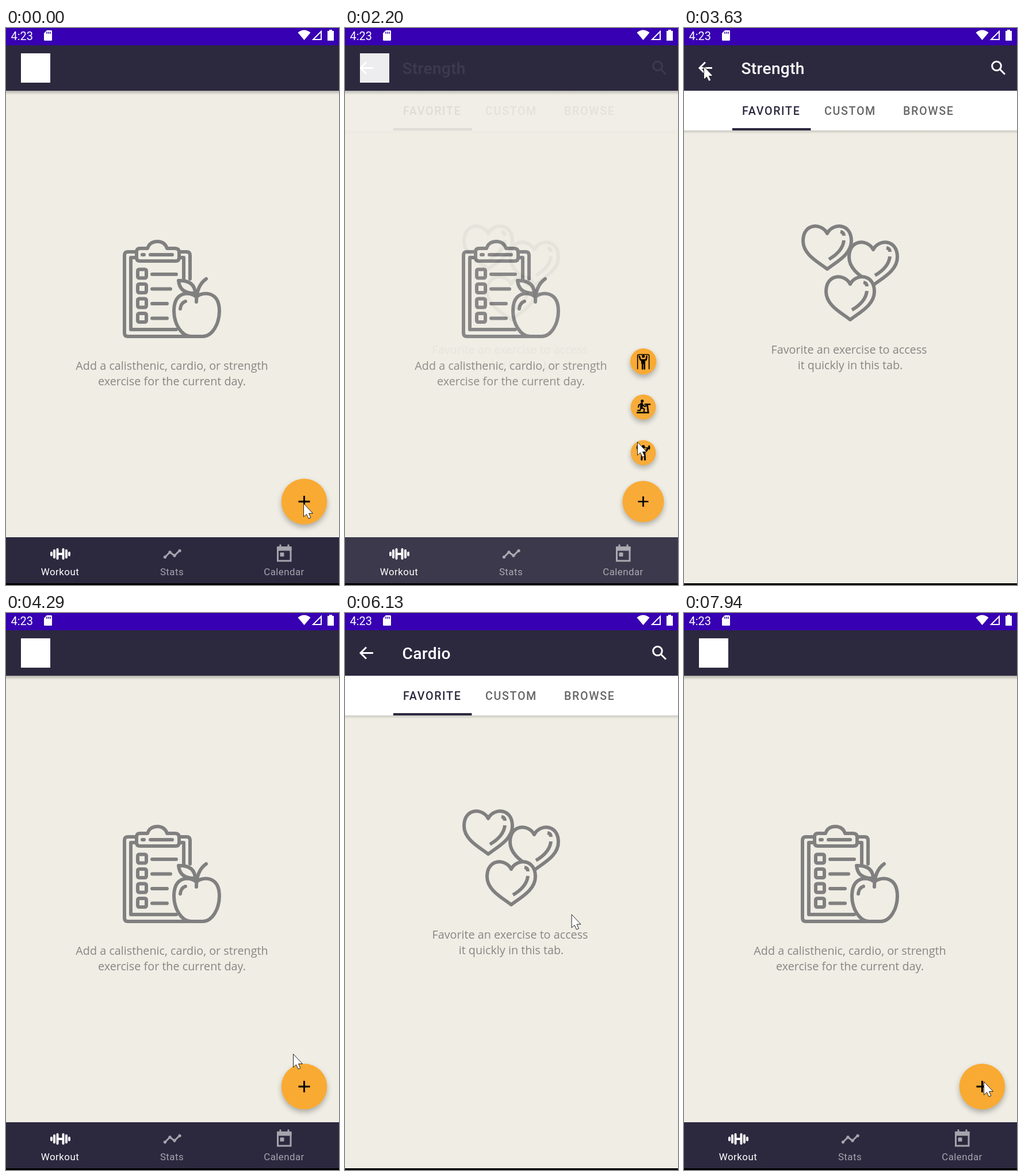
Animation of 579 by 968 pixels, one loop 8000 ms. Source, as an HTML page:

```html
<!DOCTYPE html>
<html lang="en">
<head>
<meta charset="utf-8">
<title>Workout app</title>
<style>
  html, body { margin: 0; width: 100%; height: 100%; overflow: hidden; background: #000; }
  svg { display: block; width: 100vw; height: 100vh; }
  text { font-family: Roboto, sans-serif; }
  .hint { font: 19.8px "Open Sans", sans-serif; fill: #878683; text-anchor: middle; }
  .tab { font-size: 19.7px; font-weight: 500; letter-spacing: 1.65px; fill: #666; }
  .nav { font-size: 16.9px; letter-spacing: .45px; text-anchor: middle; }
  .line { fill: none; stroke: #808080; stroke-width: 6; stroke-linecap: round; stroke-linejoin: round; }
  .shadow { filter: drop-shadow(0 5px 5px rgba(0,0,0,.27)); }
</style>
</head>
<body>
<svg viewBox="0 0 579 968" preserveAspectRatio="none">
  <defs>
    <linearGradient id="shade" x2="0" y2="1">
      <stop stop-color="#000" stop-opacity=".25"/><stop offset="1" stop-color="#000" stop-opacity="0"/>
    </linearGradient>
    <g id="heart">
      <path class="line" style="fill:#efede4" d="M0 0C-10-19-42-18-42 13C-42 37-15 50 0 62C15 50 42 37 42 13C42-18 10-19 0 0Z"/>
      <path class="line" style="stroke-linecap:butt" d="M3 45Q27 31 29 12M23-3Q29-2 29 4"/>
    </g>
  </defs>
  <rect width="579" height="965" fill="#efede4"/>

  <g id="home">
    <rect y="30" width="579" height="79" fill="#2c293f"/>
    <rect y="109" width="579" height="7" fill="url(#shade)"/>
    <rect x="26" y="44" width="51" height="51" fill="#fff"/>
    <g class="line">
      <path d="M320 436V395Q320 389 314 389H302M226 389H212Q206 389 206 395V530Q206 536 212 536H318"/>
      <path d="M225 399H217V524H296M303 399H309V437"/>
      <path d="M233 383H246Q250 371 263 371T280 383H294Q301 383 301 390V399Q301 405 295 405H233Q227 405 227 399V389Q227 383 233 383ZM251 394H289M237 394H240"/>
      <g id="checks"></g>
      <path fill="#efede4" d="M331 467C318 457 292 458 292 492C292 515 306 536 322 536C328 536 335 536 342 536C358 536 371 515 371 492C371 458 344 457 331 467Z"/>
      <path fill="#efede4" d="M300 439Q328 438 329 461Q302 462 300 439Z"/>
      <path d="M331 476C331 455 338 443 348 436M303 488Q304 478 312 475"/>
    </g>
    <text class="hint" x="288.5" y="594">Add a calisthenic, cardio, or strength</text>
    <text class="hint" x="288.5" y="621">exercise for the current day.</text>
  </g>

  <g id="nav">
    <rect y="885" width="579" height="80" fill="#2c293f"/>
    <path d="M79 912V916M84 908V920M89.500 906V922M99.500 906V922M105 908V920M110 912V916M90 914H99" stroke="#fff" stroke-width="4" stroke-linecap="round"/>
    <g fill="#a5a4ad" stroke="#a5a4ad">
      <path d="M277 919L285 911L293 917L302 908" fill="none" stroke-width="3"/>
      <circle cx="276.500" cy="919.500" r="2.300"/><circle cx="285" cy="911" r="2.300"/>
      <circle cx="293" cy="917" r="2.300"/><circle cx="302" cy="908.500" r="2.300"/>
      <path d="M472.500 902.500H495V926H472.500Z" fill="none" stroke-width="3"/>
      <path d="M472 902H496V908H472ZM476 898H478V902H476ZM490 898H492V902H490ZM477 912H483V918H477Z"/>
    </g>
    <text class="nav" x="94" y="951" fill="#fff">Workout</text>
    <text class="nav" x="288.500" y="951" fill="#a5a4ad">Stats</text>
    <text class="nav" x="483.500" y="951" fill="#a5a4ad">Calendar</text>
  </g>

  <g id="detail">
    <rect y="109" width="579" height="856" fill="#efede4"/>
    <rect y="30" width="579" height="79" fill="#2c293f"/>
    <circle id="ripple" cx="34.500" cy="68.500" fill="#fff" fill-opacity=".18"/>
    <path d="M37 59.500L27 69.500L37 79.500M27 69.500H49" fill="none" stroke="#fff" stroke-width="3"/>
    <text id="title" x="99.500" y="80" font-size="28.200" font-weight="500" letter-spacing=".3" fill="#fff"></text>
    <g fill="none" stroke="#fff" stroke-width="3"><circle cx="543.500" cy="66" r="7.800"/><path d="M549 71.500L558 80.500"/></g>
    <rect y="109" width="579" height="69" fill="#fff"/>
    <rect y="178" width="579" height="6" fill="url(#shade)" opacity=".6"/>
    <rect x="84" y="174" width="136.500" height="4" fill="#2c293f"/>
    <text class="tab" x="101" y="151" style="fill:#2c293f">FAVORITE</text>
    <text class="tab" x="244" y="151">CUSTOM</text>
    <text class="tab" x="381" y="151">BROWSE</text>
    <use href="#heart" x="329" y="385"/><use href="#heart" x="249" y="357"/><use href="#heart" x="289" y="445"/>
    <text class="hint" x="287" y="566">Favorite an exercise to access</text>
    <text class="hint" x="289" y="593">it quickly in this tab.</text>
  </g>

  <rect width="579" height="30" fill="#3700b3"/>
  <text x="8.500" y="20.500" font-size="20" fill="#fff">4:23</text>
  <path d="M71 4H78.500Q80 4 80 5.500V20.500Q80 22 78.500 22H67.500Q66 22 66 20.500V9Z" fill="#fff"/>
  <path d="M71 6.500V10M74 6.500V10M77 6.500V10" stroke="#3700b3" stroke-width="1.500"/>
  <path d="M518.500 21L507.500 8Q518.500-1 529.500 8ZM559 5H562V3H567V5H570V22H559Z" fill="#fff"/>
  <path d="M548 6V20H534Z" fill="none" stroke="#fff" stroke-width="2"/>

  <g id="minis" stroke="#000" fill="none" stroke-linecap="round">
    <g class="shadow"><circle r="22.800" fill="#f9aa33" stroke="none"/>
      <circle cy="-9" r="2.600" fill="#000" stroke="none"/>
      <path d="M-6-2L-4-4V-8M5-2L3-4" stroke="none"/>
      <path d="M-7-9L-5-3L0-2.500L5-3L6-9M-1.500 3V13M2 3V13" stroke-width="2.600"/>
      <path d="M-3.500-3H3.500L2.500 4H-2.500Z" fill="#000"/>
      <path d="M-10 13V-10Q-10-12-8-12H8Q10-12 10-10V13" stroke-width="1.600"/></g>
    <g class="shadow"><circle r="22.800" fill="#f9aa33" stroke="none"/>
      <circle cx="-2" cy="-11" r="2.700" fill="#000" stroke="none"/>
      <path d="M-3-6L-3.500 1" stroke-width="5"/>
      <path d="M-3-6L-8-4L-9 0M-2-5L2-1L5-2M-3 1L2 4L1 8M-4 1L-6 6L-10 6" stroke-width="2.300"/>
      <path d="M-11 10H9L7-5M3-5H12" stroke-width="2.800"/></g>
    <g class="shadow"><circle r="22.800" fill="#f9aa33" stroke="none"/>
      <circle cy="-11" r="2.900" fill="#000" stroke="none"/>
      <path d="M-12-9H12" stroke-width="1.500"/>
      <path d="M-10.500-12V-7M10.500-12V-7" stroke-width="3"/>
      <path d="M-8-8L-6-4H6L8-8M-2.500 4L-3 12.500M2.500 4L3 12.500" stroke-width="3.200"/>
      <path d="M-4-4H4L3 5H-3Z" fill="#000"/></g>
  </g>
  <g id="fab" class="shadow">
    <circle r="39.800" fill="#f9aa33"/>
    <path id="plus" d="M-10 0H10M0-10V10" stroke="#000" stroke-width="3"/>
  </g>
  <path id="cursor" d="M.5.5V23.500L5.500 19L9 26.500L13 25L9.500 17.500H16.500Z" stroke="#222" stroke-width="1"/>
  <circle id="tap" r="17.500" fill="#ffe900" fill-opacity=".6"/>
</svg>
<script>
const $ = id => document.getElementById(id);
const clamp = v => Math.min(1, Math.max(0, v));
const part = (t, start, span) => clamp((t - start) / span);
const smooth = p => p * p * (3 - 2 * p);
const out = p => 1 - (1 - p) ** 2;
const place = (el, x, y, scale = 1) => el.setAttribute("transform", `translate(${x} ${y}) scale(${scale})`);

$("checks").innerHTML = [296, 286, 280, 280].map((end, i) => {
  const y = 427 + i * 25.5;
  return `<rect x="229" y="${y - 7.5}" width="15" height="15" rx="2.5"/><path d="M254 ${y + 1}H${end}"/>`;
}).join("");

// time, x, y of the pointer tip
const pointer = [
  [0, 517, 826], [129, 517, 826], [130, 517, 827], [359, 517, 827], [360, 517, 828],
  [1300, 517, 828], [1740, 508, 719], [2270, 508, 719], [2820, 52, 79], [2850, 52, 79],
  [2990, 47, 82], [3130, 47, 82], [3560, 34, 66], [3790, 34, 66], [3960, 140, 280],
  [4290, 499, 766], [4750, 517, 822], [5080, 517, 822], [5590, 516, 665], [5940, 516, 665],
  [6510, 48, 124], [6870, 33, 66], [7080, 33, 66], [7150, 79, 115], [7810, 527, 783],
  [7940, 521, 814], [8000, 521, 814]
];
const taps = [[1050, 130], [2020, 110], [3730, 70], [4850, 130], [5720, 110], [7020, 90]];
const visits = [
  { title: "Strength", open: 1150, press: 2020, back: 3620 },
  { title: "Cardio", open: 4950, press: 5720, back: 7000 }
];

function pointerAt(t) {
  const i = Math.max(1, pointer.findIndex(k => k[0] > t));
  const [t0, x0, y0] = pointer[i - 1], [t1, x1, y1] = pointer[i];
  const p = smooth(part(t, t0, t1 - t0));
  return [x0 + (x1 - x0) * p, y0 + (y1 - y0) * p];
}

function draw(t) {
  const { title, open, press, back } = visits[t < 4500 ? 0 : 1];

  const shown = smooth(part(t, press + 150, 180)) - smooth(part(t, back + 120, 170));
  $("title").textContent = title;
  $("detail").setAttribute("opacity", shown);
  $("nav").setAttribute("opacity", clamp((0.9 - shown) / 0.3));
  $("ripple").setAttribute("r", 26 * out(part(t, back + 100, 45)));

  const hide = part(t, press + 120, 200), show = part(t, back + 110, 220);
  place($("fab"), 518.5, 823, t < back ? 1 - hide ** 2 : out(show));
  $("fab").setAttribute("opacity", t < back ? 1 - hide ** 3 : clamp(2.5 * show));
  const turn = smooth(part(t, open, 200)) - smooth(part(t, press + 20, 140));
  $("plus").setAttribute("transform", `rotate(${45 * turn})`);

  [...$("minis").children].forEach((mini, i) => {
    const grow = out(part(t, open + 30 * (3 - i), 180));
    const shrink = part(t, press + (i ? 145 : 180), 180);
    const size = grow * (1 - shrink ** 2);
    place(mini, 518.7, 579.5 + 79.3 * i, size);
    mini.setAttribute("opacity", size);
  });

  const [x, y] = pointerAt(t);
  const tapped = taps.some(([start, span]) => t >= start && t < start + span);
  place($("cursor"), x, y);
  $("cursor").setAttribute("fill", tapped ? "#ffff8a" : "#fff");
  place($("tap"), x - 1, y - 1);
  $("tap").setAttribute("visibility", tapped ? "visible" : "hidden");
}

const began = performance.now();
function tick() {
  draw((performance.now() - began) % 8000);
  requestAnimationFrame(tick);
}
tick();
</script>
</body>
</html>
```
